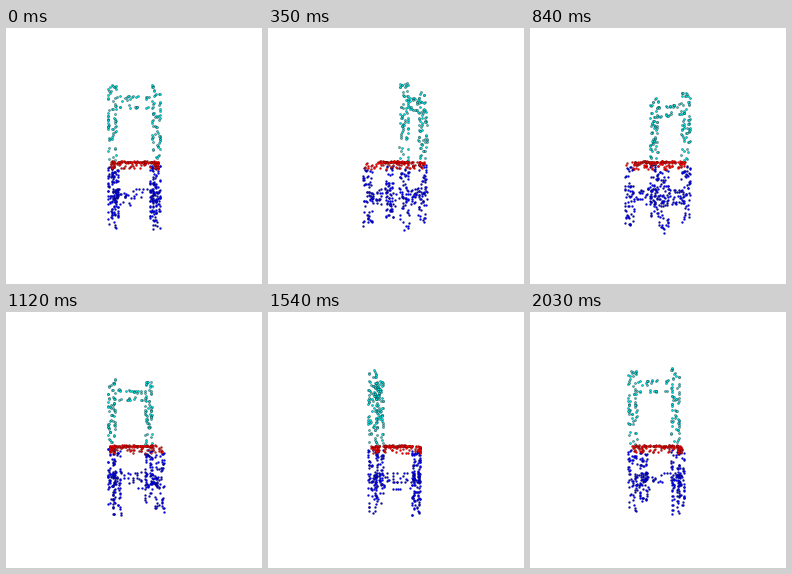
Write a matplotlib script that moves like this. It is 256 px wide and 256 px high and loops after 2.1 s.

```python
import numpy as np
import matplotlib.pyplot as plt
from matplotlib.animation import FuncAnimation

SIZE, DPI = 256, 100
FRAMES, INTERVAL = 30, 70
CX, CY = 128.0, 134.0      # vanishing point on the stage
DIST = 240.0               # camera distance
W, D = 20.3, 20.0          # half spacing of the legs

rng = np.random.default_rng(12)


def box(n, center, half):
    """Random points (across, depth, height) on the sides of a box."""
    p = rng.uniform(-1, 1, (n, 3))
    long_axis = int(np.argmax(half))
    axes = [a for a in range(3) if a != long_axis]
    face = rng.choice(axes, n)
    rows = np.arange(n)
    p[rows, face] = np.sign(p[rows, face])
    return np.array(center) + p * np.array(half)


def post(n, u, r, low, high):
    return box(n, (u, r, (low + high) / 2), (3.3, 3.3, (high - low) / 2))


def build_back():
    posts = [post(62, u, D, 1, 71) for u in (-W, W)]
    rail = box(30, (0, D, 55), (19, 2.5, 5))
    return np.vstack(posts + [rail])


def build_seat():
    half = np.array((22, 22))
    top = rng.uniform(-1, 1, (68, 3)) * (*half, 0.7)
    apron = rng.uniform(-1, 1, (64, 3)) * (*half, 3.4) - (0, 0, 3.4)
    rows = np.arange(len(apron))
    side = rng.integers(0, 2, len(apron))
    apron[rows, side] = half[side] * np.sign(apron[rows, side])
    return np.vstack([top, apron]) - (0, 1.5, 0)


def build_legs():
    parts = [post(52, u, r, -62, -3) for u in (-W, W) for r in (-D, D)]
    parts += [box(17, (0, r, -34), (19, 2.5, 5)) for r in (-D, D)]
    parts += [box(24, (u, 0, -34), (2.5, 19, 5)) for u in (-W, W)]
    return np.vstack(parts)


def project(points, angle):
    u, r, h = points.T
    c, s = np.cos(angle), np.sin(angle)
    scale = 1 / (1 - (r * c - u * s) / DIST)
    return CX + (u * c + r * s) * scale, CY - h * scale


fig = plt.figure(figsize=(SIZE / DPI, SIZE / DPI), dpi=DPI, facecolor="white")
ax = fig.add_axes([0, 0, 1, 1])
ax.set_xlim(0, SIZE)
ax.set_ylim(SIZE, 0)
ax.axis("off")

clouds = []
for points, color, edge in ((build_legs(), "#0000f0", 0.12),
                            (build_back(), "#00e0e0", 0.2),
                            (build_seat(), "#f40000", 0.12)):
    dots, = ax.plot([], [], "o", ms=1.5, mew=edge, mfc=color, mec="black")
    clouds.append((dots, points))


def update(i):
    angle = 2 * np.pi * i / FRAMES
    for dots, points in clouds:
        dots.set_data(*project(points, angle))
    return [dots for dots, _ in clouds]


anim = FuncAnimation(fig, update, frames=FRAMES, interval=INTERVAL,
                     repeat=True, repeat_delay=0)
plt.show()
```
